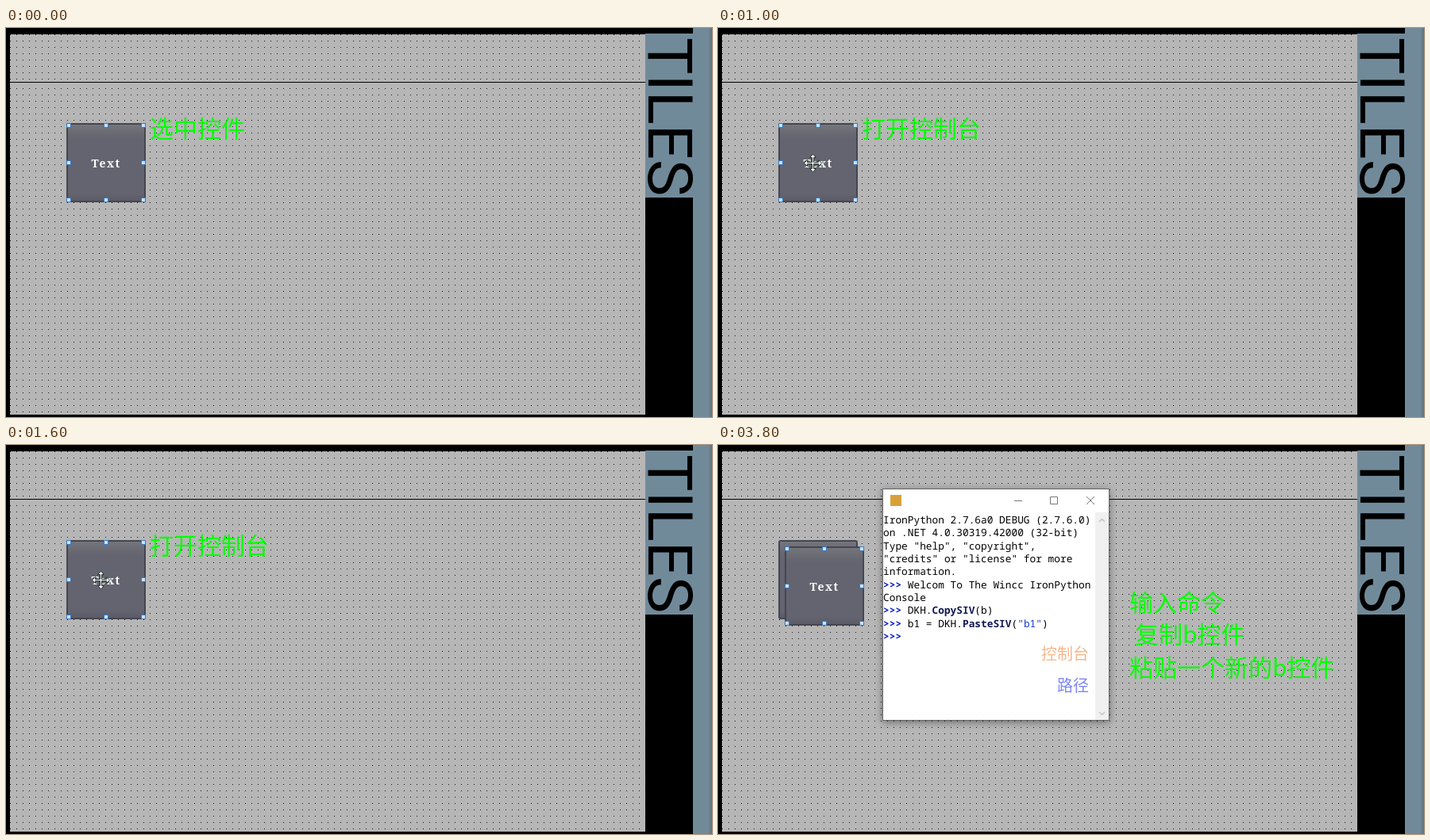
Animation, 889 px wide and 491 px high, one loop 5 s. Source, as an HTML page:

```html
<!DOCTYPE html>
<html lang="zh">
<head>
<meta charset="utf-8">
<title>Console demo</title>
<style>
  html, body { margin: 0; width: 100%; height: 100%; overflow: hidden; background: #000; }
  svg { display: block; width: 889px; height: 491px; }
  text { white-space: pre; }
  .note { font: 30px "Noto Sans CJK SC", "Noto Sans CJK", sans-serif; fill: #0f0; }
  .label { font: bold 14px "Noto Serif", serif; letter-spacing: 1.4px; fill: #fff; }
  .brand { font: 78px Roboto, sans-serif; }
  .console { font: 12.82px "Noto Sans Mono", monospace; text-rendering: geometricPrecision; }
  .prompt { font-weight: bold; fill: #0018c8; }
  .call { font-weight: bold; fill: #101850; }
  .string { fill: #1838d0; }
  .tag { font: 300 20px "Noto Sans CJK SC", "Noto Sans CJK", sans-serif; }
  .window { filter: drop-shadow(0 2px 5px #0006); }
</style>
</head>
<body>
<svg viewBox="0 0 889 491">
  <defs>
    <pattern id="dots" width="8" height="8" patternUnits="userSpaceOnUse">
      <rect width="8" height="8" fill="#b6b6b6"/>
      <rect width="1" height="1" fill="#111"/>
    </pattern>
    <linearGradient id="face" x2="0" y2="1">
      <stop stop-color="#76767d"/>
      <stop offset=".16" stop-color="#65666f"/>
      <stop offset=".2" stop-color="#636470"/>
      <stop offset=".9" stop-color="#636470"/>
      <stop offset="1" stop-color="#595a66"/>
    </linearGradient>
    <linearGradient id="edge">
      <stop offset=".8" stop-color="#718a9a"/>
      <stop offset="1" stop-color="#627078"/>
    </linearGradient>
    <g id="button">
      <rect x="1" y="1" width="98" height="98" rx="2" fill="url(#face)" stroke="#464652" stroke-width="2"/>
    </g>
  </defs>

  <rect width="889" height="491"/>
  <rect width="800" height="60" fill="url(#dots)" transform="translate(5 8)"/>
  <rect width="800" height="420" fill="url(#dots)" transform="translate(5 68)"/>
  <rect x="5" y="68" width="800" height="1"/>
  <rect x="805" y="7" width="60" height="207" fill="#718a9a"/>
  <rect x="865" width="24" height="491" fill="url(#edge)"/>
  <text class="brand" transform="translate(809 12) rotate(90)">TILES</text>

  <use href="#button" x="76" y="120"/>
  <g id="selected">
    <use href="#button"/>
    <text class="label" x="31.5" y="56">Text</text>
    <g id="handles" fill="#c4e4ff" stroke="#3a78c0"></g>
  </g>

  <g class="scene"><text class="note" x="181" y="138">选中控件</text></g>

  <g class="scene">
    <text class="note" x="181" y="138">打开控制台</text>
    <path transform="translate(119.5 170.5)" fill="#fff" stroke="#26352c"
      d="M0-11l4 4h-3v6h6v-3l4 4-4 4v-3h-6v6h3l-4 4-4-4h3v-6h-6v3l-4-4 4-4v3h6v-6h-3z"/>
  </g>

  <g class="scene">
    <rect class="window" x="207.5" y="55.5" width="285" height="292" fill="#fff" stroke="#666"/>
    <rect x="217" y="63" width="14" height="14" fill="#d9a03a"/>
    <path d="M373 70.5h10M418.5 65.5h9v9h-9zM464 65l10 10m0-10l-10 10" fill="none" stroke="#777"/>
    <rect x="475" y="85" width="17" height="262" fill="#f0f0f0"/>
    <path d="M480 97l3.5-3.5 3.5 3.5M480 337l3.5 3.5 3.5-3.5" fill="none" stroke="#c4c4c4" stroke-width="1.5"/>
    <g class="console" id="console"></g>
    <text class="tag" x="407" y="271" fill="#f4b78c">控制台</text>
    <text class="tag" x="427" y="311" fill="#7c86f6">路径</text>
    <text class="note" x="518" y="210">输入命令</text>
    <text class="note" x="525" y="250">复制b控件</text>
    <text class="note" x="518" y="292">粘贴一个新的b控件</text>
  </g>
</svg>
<script>
const byId = id => document.getElementById(id);
const span = (style, text) => `<tspan class="${style}">${text}</tspan>`;
const prompt = span("prompt", "&gt;&gt;&gt; ");

const lines = [
  "IronPython 2.7.6a0 DEBUG (2.7.6.0)",
  "on .NET 4.0.30319.42000 (32-bit)",
  'Type "help", "copyright",',
  '"credits" or "license" for more',
  "information.",
  prompt + "Welcom To The Wincc IronPython",
  "Console",
  prompt + "DKH." + span("call", "CopySIV") + "(b)",
  prompt + "b1 = DKH." + span("call", "PasteSIV") + "(" + span("string", '"b1"') + ")",
  prompt
];
byId("console").innerHTML = lines.map((line, i) =>
  `<text x="208" y="${99 + i * 16.35}">${line}</text>`).join("");

const stops = [3, 50, 97];
byId("handles").innerHTML = stops.flatMap(y => stops
  .filter(x => x !== 50 || y !== 50)
  .map(x => `<rect x="${x - 2.5}" y="${y - 2.5}" width="5" height="5"/>`)).join("");

const scenes = document.querySelectorAll(".scene");
const start = performance.now();

function draw(now) {
  const time = Math.max(0, now - start) % 5000;
  const current = Math.min(2, Math.floor(time / 1000));
  scenes.forEach((scene, i) => scene.style.display = i === current ? "" : "none");
  const shift = current === 2 ? 8 : 0;
  byId("selected").setAttribute("transform", `translate(${76 + shift} ${120 + shift})`);
  requestAnimationFrame(draw);
}
draw(start);
</script>
</body>
</html>
```
